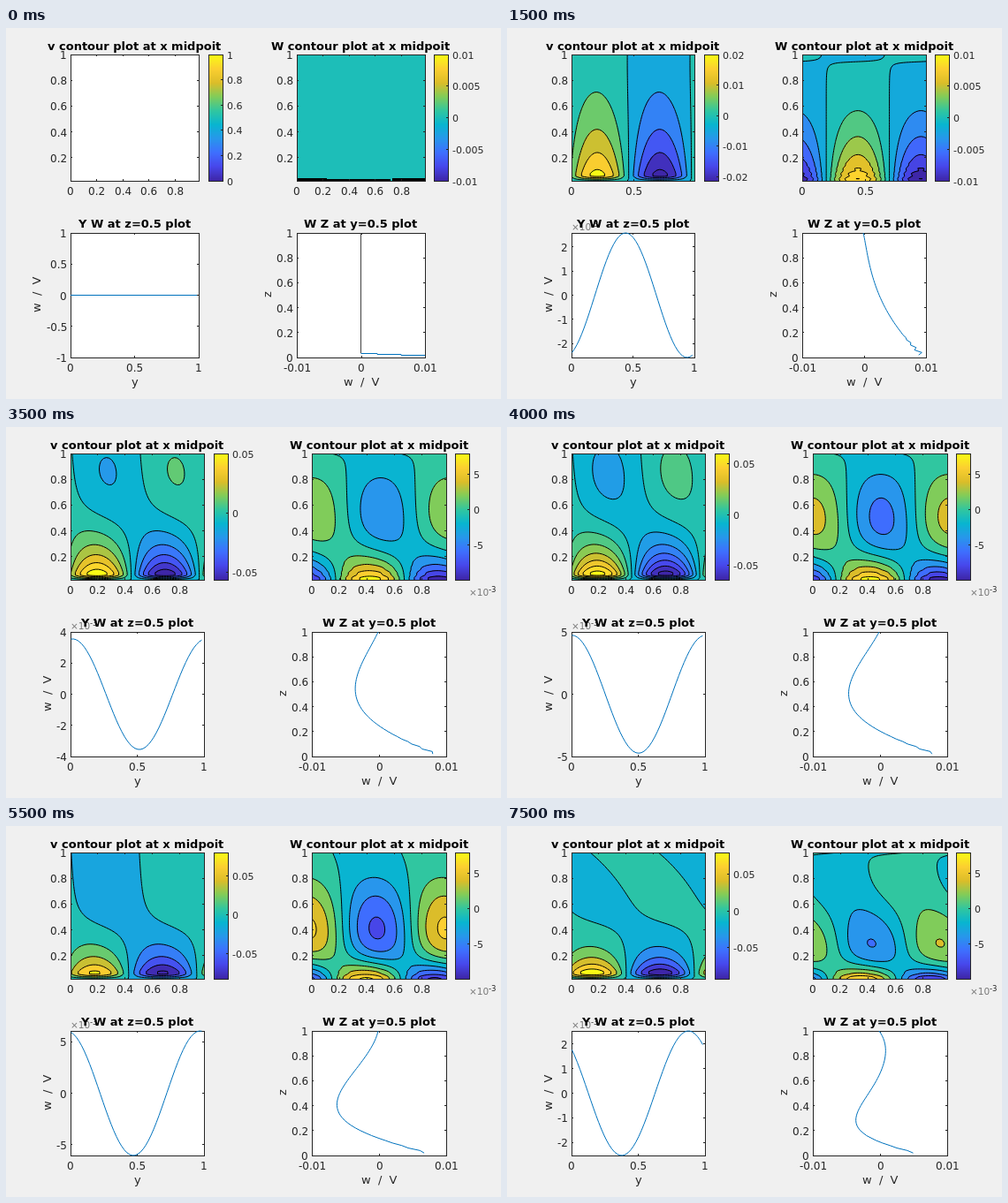
Recreate the animation shown at these times as an HTML page with a canvas. Size 560 px wide and 420 px high, loop 8 s.

```html
<!DOCTYPE html>
<html lang="en">
<head>
<meta charset="utf-8">
<title>Contour plots</title>
<style>
html, body { margin: 0; width: 100%; height: 100%; overflow: hidden; background: #f0f0f0; }
canvas { display: block; }
</style>
</head>
<body>
<canvas id="stage" width="560" height="420"></canvas>
<script>
const ctx = document.getElementById('stage').getContext('2d');
const FONT = '"DejaVu Sans", sans-serif';
const INK = '#262626', BLUE = '#0072bd';
const STEP_MS = 500, FRAMES = 16, N = 50;
const TAU = Math.PI * 2;
const { sin, cos, exp, min, max, floor, hypot } = Math;

// A field is a sum of waves in y, each an [amplitude (1e-3), crest] pair depending on z.
// The layer at the wall thins with time while a cell above it grows, sinks and tilts.
const layer = (t, power) => .75 * (1 - exp(-t * t)) / t ** power;
const swell = (t, from, span) => max(0, sin(Math.PI * (t - from) / span));

function wField(t) {
  const depth = layer(t, 1);
  const cell = 7.1 * swell(t, 1.6, 7.9) ** 1.2, centre = .6 - .066 * (t - 2.5);
  const late = 1.7 * max(0, t - 5);
  return z => {
    const q = z / centre, lid = 1 - z ** 4;
    return [
      [10.5 * exp(-z / depth) * (1 - z * z), .44 - .0015 * t * t],
      [cell * q * q * exp(2 - 2 * q) * lid, .015 - .0015 * t * t],
      [late * z * z * lid, -.38],
      [.25 * z ** 12, -.1]
    ];
  };
}

const vPeak = t => 93 * sin(Math.PI * t / 15) ** 1.25;
function vField(t) {
  const depth = layer(t, .85), cell = 17.5 * swell(t, 1.4, 7.4);
  return z => [
    [vPeak(t) * min(1, (z - .02) / .035) * exp(-max(0, z - .08) / depth), .205 - .001 * t * t],
    [cell * sin(2.2 * z ** 1.4), -.21 - .04 * z - .18 * max(0, t - 5.5) * z ** 3]
  ];
}

// Row r is at z = .02 + .02 r, column c at y = .02 c.
function makeGrid(field, rough) {
  return Array.from({ length: N }, (_, r) => {
    const z = .02 + .02 * r;
    const gain = 1 + rough * (r % 2 ? 1 : -1) * max(0, 1 - z / .2);
    const waves = field(z);
    return Array.from({ length: N }, (_, c) =>
      gain * waves.reduce((sum, [a, p]) => sum + a * cos(TAU * (.02 * c - p)), 0));
  });
}

const PARULA = [
  [62, 38, 168], [71, 71, 235], [62, 111, 255], [39, 151, 235], [8, 181, 208],
  [49, 198, 159], [129, 204, 89], [220, 189, 41], [252, 207, 48], [249, 251, 21]
];
function parula(t) {
  const x = max(0, min(1, t)) * 9, i = min(8, floor(x));
  return PARULA[i].map((c, j) => Math.round(c + (PARULA[i + 1][j] - c) * (x - i)));
}
const css = c => `rgb(${c})`;
const label = v => String(+v.toFixed(4));

// Text starts on whole pixels; anchor is 0 for left, .5 for centre, 1 for right.
function text(str, x, y, size = 12, anchor = .5, color = INK, weight = '') {
  ctx.font = `${weight} ${size}px ${FONT}`;
  ctx.fillStyle = color;
  ctx.fillText(str, Math.round(x - ctx.measureText(str).width * anchor), Math.round(y));
}
const title = (str, x, y) => text(str, x, y, 13, .5, '#000', 'bold');
function upright(str, x, y) {
  ctx.save();
  ctx.translate(x, y);
  ctx.rotate(-Math.PI / 2);
  text(str, 0, 0, 13);
  ctx.restore();
}
function powerOfTen(x, y) {
  text('×10', x, y, 10.5, 0, '#777');
  text('-3', x + 22, y - 4, 8.5, 0);
}
function path(points, color) {
  ctx.beginPath();
  points.forEach(([x, y]) => ctx.lineTo(x, y));
  ctx.strokeStyle = color;
  ctx.lineWidth = 1;
  ctx.stroke();
}
function outline(x, y, w, h) {
  ctx.strokeStyle = INK;
  ctx.lineWidth = 1;
  ctx.strokeRect(x + .5, y + .5, w, h);
}
function range(from, to, step) {
  const out = [];
  for (let i = Math.ceil(from / step - 1e-6); i <= to / step + 1e-6; i++) out.push(i * step);
  return out;
}

// Box with inward ticks; xs and ys hold the tick values, px and py map them to pixels.
function frameBox(b, xs, ys, px, py) {
  outline(b.l, b.t, b.r - b.l, b.b - b.t);
  const snap = v => floor(v) + .5;
  xs.forEach(v => {
    const x = snap(px(v));
    path([[x, b.b], [x, b.b - 2]], INK);
    path([[x, b.t], [x, b.t + 2]], INK);
    text(label(v), px(v), b.b + 16);
  });
  ys.forEach(v => {
    const y = snap(py(v));
    path([[b.l, y], [b.l + 2, y]], INK);
    path([[b.r, y], [b.r - 2, y]], INK);
    text(label(v), b.l - 4, py(v) + 5, 12, 1);
  });
}

function colorbar(x, lo, hi, ticks, unit) {
  const t = 30, h = 143;
  for (let i = 0; i < h; i++) {
    ctx.fillStyle = css(parula(1 - i / (h - 1)));
    ctx.fillRect(x, t + i, 16, 1);
  }
  outline(x, t, 16, h);
  ticks.forEach(v => {
    const y = t + h * (hi - v) / (hi - lo), line = floor(y) + .5;
    path([[x + 14, line], [x + 16, line]], INK);
    text(label(v * unit), x + 20.5, y + 4.5, 11, 0);
  });
}

function fillBands(b, grid, lo, hi, step) {
  const w = b.r - b.l, h = b.b - b.t;
  const img = ctx.createImageData(w, h);
  for (let y = 0, o = 0; y < h; y++) {
    const gr = (1 - (y + .5) / h) * (N - 1), r = floor(gr), v = gr - r;
    for (let x = 0; x < w; x++, o += 4) {
      const gc = (x + .5) / w * (N - 1), c = floor(gc), u = gc - c;
      const val = (grid[r][c] * (1 - u) + grid[r][c + 1] * u) * (1 - v)
        + (grid[r + 1][c] * (1 - u) + grid[r + 1][c + 1] * u) * v;
      const band = max(lo, min(hi, floor(val / step) * step));
      img.data.set([...parula((band - lo) / (hi - lo)), 255], o);
    }
  }
  ctx.putImageData(img, b.l, b.t);
}

// Marching squares.
function contourLines(b, grid, levels) {
  const px = c => b.l + .5 + (b.r - b.l) * c / (N - 1);
  const py = r => b.b + .5 - (b.b - b.t) * r / (N - 1);
  const ring = [[0, 0], [0, 1], [1, 1], [1, 0]];
  ctx.beginPath();
  for (const level of levels) {
    for (let r = 0; r < N - 1; r++) for (let c = 0; c < N - 1; c++) {
      const hits = [];
      ring.forEach(([r0, c0], k) => {
        const [r1, c1] = ring[(k + 1) % 4];
        const a = grid[r + r0][c + c0] - level, d = grid[r + r1][c + c1] - level;
        if (a < 0 === d < 0) return;
        const u = a / (a - d);
        hits.push([px(c + c0 + (c1 - c0) * u), py(r + r0 + (r1 - r0) * u)]);
      });
      for (let k = 0; k + 1 < hits.length; k += 2) {
        ctx.moveTo(...hits[k]);
        ctx.lineTo(...hits[k + 1]);
      }
    }
  }
  ctx.strokeStyle = '#000';
  ctx.lineWidth = 1;
  ctx.stroke();
}

function contourPlot(b, grid, lo, hi, step) {
  fillBands(b, grid, lo, hi, step);
  contourLines(b, grid, range(lo, hi, step));
}

function layout(f) {
  if (f === 0) return { l1: 73, r1: 218, l2: 329, r2: 474, step: .2 };
  if (f === 3 || f === 4) return { l1: 73, r1: 212, l2: 334, r2: 474, step: .5, wide: true };
  return { l1: 73, r1: 224, l2: 346, r2: 498, step: .2 };
}

function topAxes(b, step) {
  frameBox(b, range(0, .97, step), range(.2, 1, .2),
    v => b.l + (b.r - b.l) * v / .98, v => b.b - (b.b - b.t) * (v - .02) / .98);
}

// Limit and tick step of the lower left plot for amplitude a.
function profileScale(a) {
  if (a <= 1.5) return [Math.ceil(a * 2 - .1) / 2, .5];
  if (a < 3) return [a, 1];
  if (a < 4) return [4, 2];
  return [max(a, 5), 5];
}

// Contour step and colorbar tick step for the v plot.
function vScale(peak) {
  const step = peak < 12 ? 2 : peak < 25 ? 5 : peak < 65 ? 10 : 20;
  const mark = peak < 12 ? 5 : peak < 40 ? 10 : peak > 65 && peak < 80 ? 20 : 50;
  return [step, mark];
}

function draw(f) {
  const lay = layout(f), start = f === 0, t = f * STEP_MS / 1000;
  const vBox = { l: lay.l1, r: lay.r1, t: 30, b: 173 };
  const wBox = { l: lay.l2, r: lay.r2, t: 30, b: 173 };
  const yBox = { ...vBox, t: 232, b: 373 };
  const zBox = { ...wBox, t: 232, b: 373 };
  const mid1 = (lay.l1 + lay.r1) / 2, mid2 = (lay.l2 + lay.r2) / 2;

  ctx.fillStyle = '#f0f0f0';
  ctx.fillRect(0, 0, 560, 420);
  ctx.fillStyle = '#fff';
  for (const b of [vBox, yBox, zBox]) ctx.fillRect(b.l, b.t, b.r - b.l, b.b - b.t);

  let wGrid, lim = 1, tick = .5;
  if (start) {
    ctx.fillStyle = css(parula(.5));
    ctx.fillRect(wBox.l, wBox.t, 145, 143);
    ctx.fillStyle = '#000';
    ctx.fillRect(329, 170, 34, 3);
    ctx.fillRect(363, 171, 72, 2);
    ctx.fillRect(437, 170, 37, 3);
    colorbar(229, 0, 1, range(0, 1, .2), 1);
    colorbar(484, -10, 10, range(-10, 10, 5), .001);
  } else {
    const peak = vPeak(t), [step, mark] = vScale(peak);
    const top = floor(peak / step) * step;
    contourPlot(vBox, makeGrid(vField(t), 0), -peak, top, step);
    colorbar(lay.r1 + 11, -peak, top, range(-peak, top, mark), .001);

    const w = wField(t), lo = lay.wide ? -10 : -9.9, hi = lay.wide ? 10 : 8;
    wGrid = makeGrid(w, .06);
    contourPlot(wBox, wGrid, lo, hi, 2);
    colorbar(lay.r2 + 10, lo, hi, range(lo, hi, 5), lay.wide ? .001 : 1);
    if (!lay.wide) powerOfTen(524, 191);

    const half = w(.5), part = fn => half.reduce((sum, [a, p]) => sum + a * fn(TAU * p), 0);
    [lim, tick] = profileScale(hypot(part(cos), part(sin)));
  }
  topAxes(vBox, lay.step);
  topAxes(wBox, lay.step);

  const py = v => 302.5 - 70.5 * v / lim;
  const pz = z => zBox.b - 141 * z;
  const pw = w => mid2 + .5 + (zBox.r - zBox.l) * w / 20;
  frameBox(yBox, [0, .5, 1], range(-lim, lim, tick), v => yBox.l + (yBox.r - yBox.l) * v, py);
  frameBox(zBox, [-.01, 0, .01], range(0, 1, .2), v => pw(v * 1000), pz);

  if (start) {
    path([[73, 302.5], [216, 302.5]], BLUE);
    path([[401.5, 232], [401.5, 368]], '#404040');
    path([[401.5, 368.5], [420, 368.5], [420, 369.5], [447, 369.5], [447, 370.5], [474, 370.5]], BLUE);
  } else {
    path(wGrid[24].map((w, c) => [yBox.l + .5 + (yBox.r - yBox.l) * .02 * c, py(w)]), BLUE);
    path(wGrid.map((row, r) => [pw(row[25]), pz(.02 + .02 * r)]), BLUE);
    powerOfTen(73, 229);
  }

  title('v contour plot at x midpoit', mid1, 25);
  title('W contour plot at x midpoit', mid2, 25);
  title('Y W at z=0.5 plot', mid1, 226);
  title('W Z at y=0.5 plot', mid2, 226);
  text('y', mid1 + .5, 405, 13);
  text('w  /  V', mid2 + .5, 405, 13);
  upright('w  /  V', tick < 1 ? 39 : 51, 302);
  upright('z', zBox.l - 29, 302);
}

let shown = -1;
const begin = performance.now();
function loop() {
  const f = floor((performance.now() - begin) / STEP_MS) % FRAMES;
  if (f !== shown) draw(shown = f);
  requestAnimationFrame(loop);
}
loop();
</script>
</body>
</html>
```
